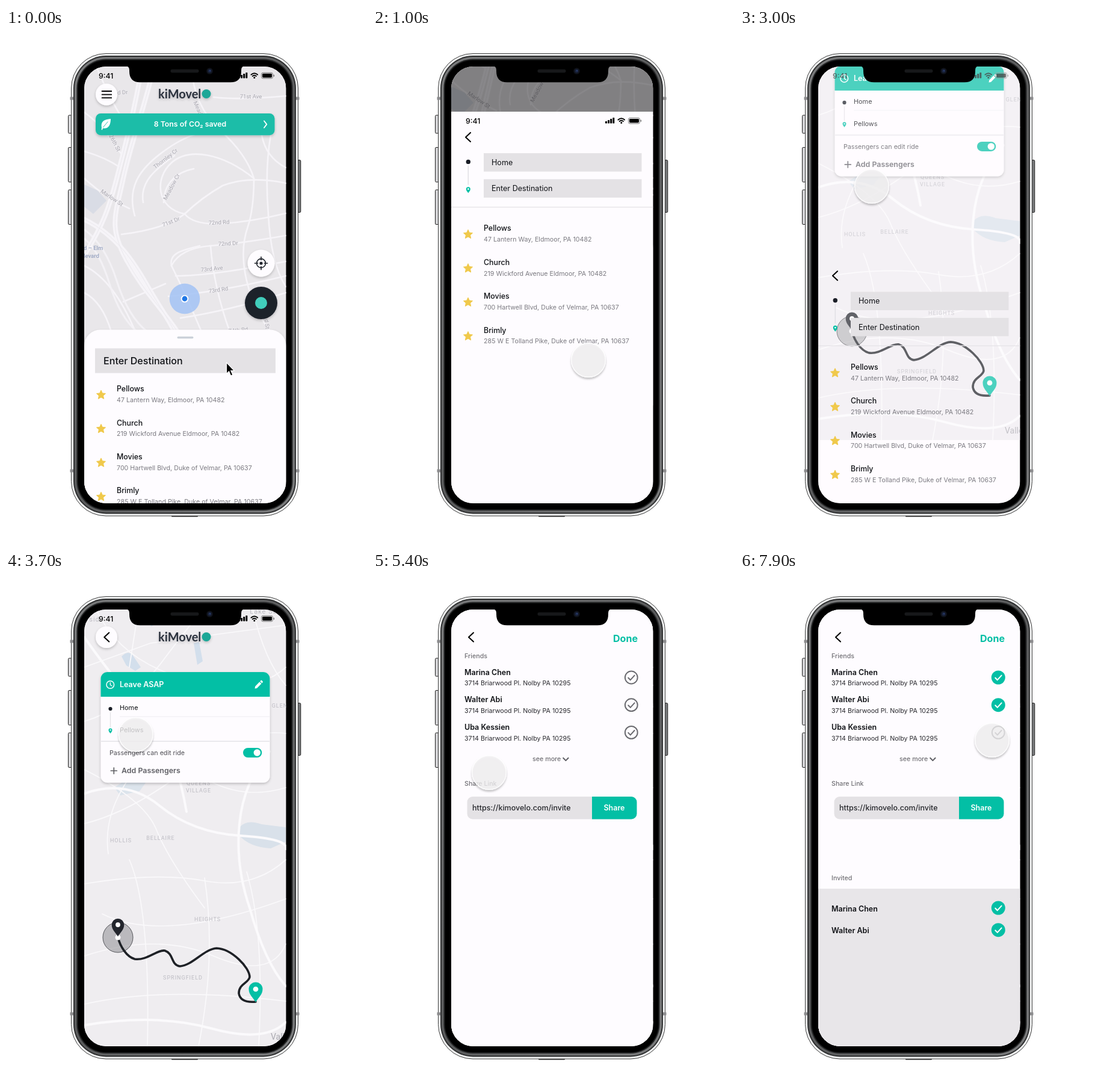
An HTML page that plays this animation: 600 px wide and 856 px high, repeating every 8 s.

```html
<!DOCTYPE html>
<html lang="en">
<head>
<meta charset="utf-8">
<title>Ride app walkthrough</title>
<style>
html, body { margin: 0; width: 100%; height: 100%; overflow: hidden; background: #fff; }
svg { display: block; width: 600px; height: 856px; font-family: Inter, sans-serif; }
.map text { font-family: Roboto, sans-serif; }
</style>
</head>
<body>
<svg id="stage" viewBox="0 0 600 856" xmlns="http://www.w3.org/2000/svg"></svg>
<script>
const TEAL = '#03bfa5', PAPER = '#fefcff', FIELD = '#e4e2e5', INK = '#101216', GREY = '#717075';
const HEIGHT = 726, LOOP = 8000, SLIDE = 380;

// ---- small drawing helpers ----
const text = (x, cy, s, size = 12.5, weight = 500, fill = INK, extra = '') =>
  `<text x="${x}" y="${cy + size * 0.36}" font-size="${size}" font-weight="${weight}" fill="${fill}" ${extra}>${s}</text>`;
const rect = (x, y, w, h, fill, r = 0, extra = '') =>
  `<rect x="${x}" y="${y}" width="${w}" height="${h}" rx="${r}" fill="${fill}" ${extra}/>`;
const disc = (x, y, r, fill, extra = '') => `<circle cx="${x}" cy="${y}" r="${r}" fill="${fill}" ${extra}/>`;
const line = (d, color, w = 2, extra = '') =>
  `<path d="${d}" fill="none" stroke="${color}" stroke-width="${w}" stroke-linecap="round" stroke-linejoin="round" ${extra}/>`;
const shape = (d, fill, extra = '') => `<path d="${d}" fill="${fill}" ${extra}/>`;
const group = (id, body, extra = '') => `<g id="${id}" ${extra}>${body}</g>`;
const pane = fill => rect(130, 64, 335.5, HEIGHT, fill);
const roads = (list, w, color) => list.map(d => line(d, color, w)).join('');
const label = (x, y, s, turn = 0, size = 9.5, fill = '#aaa9b0') =>
  text(x, y, s, size, 400, fill, `text-anchor="middle" transform="rotate(${turn} ${x} ${y})" stroke="#efedf1" stroke-width="2" paint-order="stroke"`);
const area = (x, y, s, size = 9) =>
  text(x, y, s, size, 400, '#bdbcc3', 'text-anchor="middle" letter-spacing="1"');
const back = (x, y) => line(`M${x + 4} ${y - 7.5}l-8 7.5l8 7.5`, '#000', 2.1);
const pin = (x, y, r, fill) =>
  shape(`M${x} ${y + r * 1.9}C${x - r * .4} ${y + r * 1.2} ${x - r} ${y + r * .8} ${x - r} ${y}A${r} ${r} 0 0 1 ${x + r} ${y}C${x + r} ${y + r * .8} ${x + r * .4} ${y + r * 1.2} ${x} ${y + r * 1.9}Z`, fill) +
  disc(x, y, r * 0.38, '#fff');

function star(x, y) {
  let d = '';
  for (let i = 0; i < 10; i++) {
    const r = i % 2 ? 3.8 : 7.9, a = (i / 5 - 0.5) * Math.PI;
    d += `${i ? 'L' : 'M'}${(x + r * Math.cos(a)).toFixed(2)} ${(y + r * Math.sin(a)).toFixed(2)}`;
  }
  return shape(d + 'Z', '#f0c94b', 'stroke="#f0c94b" stroke-width="1" stroke-linejoin="round"');
}

function tick(x, y, on) {
  const mark = `M${x - 5} ${y + .5}l3.5 3.7l6.8 -7.6`;
  return on ? disc(x, y, 11.5, TEAL) + line(mark, '#fff', 2)
            : disc(x, y, 10.4, 'none', `stroke="#6b6b70" stroke-width="2"`) + line(mark, '#6b6b70', 2);
}

const status = () =>
  text(154, 79.7, '9:41', 12.3, 500, '#000') +
  [0, 1, 2, 3].map(i => rect(386 + i * 4.1, 80 - i * 2, 3, 3.5 + i * 2, '#000', .7)).join('') +
  line('M407.5 77.5q5.3 -4.6 10.6 0', '#000', 2) + line('M409.7 80q3.1 -2.6 6.2 0', '#000', 1.9) + disc(412.8, 82.4, 1.5, '#000') +
  rect(424.5, 74.3, 19, 9.6, 'none', 2.6, 'stroke="#777" stroke-width="1"') +
  rect(426, 75.8, 16, 6.6, '#000', 1.4) + rect(444.7, 77.5, 1.4, 3.4, '#777', .7);

const wordmark = () =>
  `<g filter="url(#soft)">${text(253, 109.3, 'kiMovel', 20, 700, '#2b303d', 'style="font-family:Lato,sans-serif"')}${disc(333, 109.5, 7.5, '#1fa797')}</g>`;

const PLACES = [
  ['Pellows', '47 Lantern Way, Eldmoor, PA 10482'],
  ['Church', '219 Wickford Avenue Eldmoor, PA 10482'],
  ['Movies', '700 Hartwell Blvd, Duke of Velmar, PA 10637'],
  ['Brimly', '285 W E Tolland Pike, Duke of Velmar, PA 10637']
];
const places = y => PLACES.map(([name, street], i) => {
  const cy = y + i * 56.4;
  return star(158, cy + 10.3) + text(184, cy, name, 12.4) + text(184, cy + 18.4, street, 10.7, 400, '#7b7a80');
}).join('');

// ---- street map ----
function streetMap() {
  const small = [
    'M130 250Q165 282 205 300', 'M192 343Q265 334 297 309Q325 282 360 262Q405 245 465 258',
    'M214 312C200 262 225 232 262 205S330 166 385 172', 'M228 290C222 256 248 235 280 212',
    'M297 309C250 300 246 250 275 224S360 208 412 250', 'M262 290C262 262 280 240 312 234',
    'M297 309Q312 328 360 325T465 308', 'M275 395Q290 366 340 362T465 345',
    'M282 412Q340 412 465 388', 'M270 446Q360 438 465 412', 'M290 482Q370 470 465 440',
    'M275 395C270 372 300 368 322 362', 'M275 395Q300 445 325 505',
    'M345 115Q390 120 465 113', 'M308 64Q312 130 356 170T412 250Q412 300 402 330Q388 370 400 420T440 505',
    'M425 178Q432 215 465 232', 'M440 178Q430 235 436 310Q440 390 465 430', 'M340 362Q345 430 372 505',
    'M130 140Q165 165 195 215', 'M130 205Q165 215 190 232', 'M150 64Q178 130 200 160',
    'M130 395Q180 420 215 505', 'M130 440Q160 455 175 505', 'M195 455L265 425'
  ];
  const big = ['M246 64C228 140 208 190 195 250S170 330 200 385S255 460 285 505',
    'M226 64C214 135 197 200 184 250S162 325 132 375',
    'M130 318C185 345 213 390 236 430S268 480 280 505'];
  const rails = ['M130 335Q165 360 184 420T235 505', 'M130 350Q155 370 172 425T218 505'];
  return pane('#e9e7ea') +
    shape('M130 260L152 270L167 287L145 309L130 297Z', '#d9dce5') +
    roads(small, 2.6, '#f6f4f8') + roads(rails, 3, '#f3f1f5') + roads(big, 8, '#f6f4f8') +
    roads(big, 1, '#ebe9ee') +
    label(191, 107, 'nd Dr', -3) + label(407, 114, '71st Ave') + label(319, 133, 'Mead', 66) +
    label(181, 191, '26th St', 62) + label(265, 217, 'Thornley Cr', -38) + label(275, 264, 'Meadow Cr', -62) +
    label(176, 282, 'Marlow St', 34) + label(274, 322, '71st Dr', -22) + label(354, 323, '72nd Rd', -3) +
    label(369, 358, '72nd Dr', -3) + label(342, 400, '73rd Ave', -6) + label(353, 435, '73rd Rd', -8) +
    label(386, 502, '74th Rd', -6) + label(434, 492, 'd St', 84) +
    text(129, 366, 'd – Elm', 9.5, 500, '#98a4c1') + text(129, 379, 'levard', 9.5, 500, '#98a4c1');
}

function homeScreen() {
  const leaf = 'M159 166C157 155 163 152 174 151C174 162 170 168 161 166.5L160 169.5L158.5 169Z';
  return `<g class="map">${streetMap()}</g>` + status() +
    disc(167, 110.5, 18, PAPER, 'filter="url(#soft)"') +
    [105, 110.6, 116.2].map(y => rect(158.8, y - .9, 17.2, 1.8, '#000', .5)).join('') + wordmark() +
    rect(149, 142, 297.5, 36.3, '#1bbda8', 8.5, 'filter="url(#soft)"') + shape(leaf, '#fff') +
    line('M161.5 165L169 156', '#1bbda8', .9) +
    text(306, 160, '8 Tons of CO₂ saved', 12.3, 600, '#fff', 'text-anchor="middle"') +
    line('M429 154.5l4.3 5.6l-4.3 5.6', '#fff', 1.8) +
    disc(297, 450, 25.3, '#a6c4f5', 'opacity=".88"') + disc(297, 450, 6.3, '#fff') + disc(297, 450, 4.4, '#2078e6') +
    disc(424, 391, 22.5, PAPER, 'filter="url(#soft)"') +
    disc(424, 391, 7.4, 'none', 'stroke="#20242c" stroke-width="1.7"') + disc(424, 391, 2.6, '#20242c') +
    line('M424 380.5v5M424 396.5v5M413.5 391h5M429.5 391h5', '#20242c', 1.7) +
    disc(424, 457, 27, '#1c202b', 'filter="url(#soft)"') + disc(424, 457, 10, '#41cdbb') +
    rect(130, 501.5, 335.5, 560, PAPER, 27, 'filter="url(#soft)"') + rect(284.5, 512.8, 27, 3.4, '#cbd1d9', 1.7) +
    rect(148, 532.5, 300, 41, FIELD) + text(162, 552.8, 'Enter Destination', 16.1) + places(599.7);
}

function searchScreen() {
  return group('searchPaper', pane(PAPER)) + group('searchStatus', status()) +
    back(158, 106.3) + disc(158.3, 147.3, 3.7, '#1a1d26') + line('M158.3 154V185', '#e2e1e5', 1.6) + pin(158.3, 192.6, 3.5, TEAL) +
    rect(184, 133, 262.5, 30.5, FIELD) + text(197, 148.4, 'Home', 12.6, 400) +
    rect(184, 176.3, 262.5, 30.5, FIELD) + text(197, 191.5, 'Enter Destination', 12.6, 400) +
    rect(130, 222, 335.5, 1.4, '#e6e4e8') + places(257.8);
}

// ---- area map with route ----
function areaMap() {
  const thin = [
    'M130 250Q200 230 260 150T330 64', 'M150 64Q190 150 300 180T465 160', 'M130 160L240 120L465 90',
    'M130 330Q230 380 250 430T330 560', 'M130 420Q210 400 300 330T465 270', 'M170 470Q160 400 215 330',
    'M130 520Q250 500 330 515T465 480', 'M220 64L205 160', 'M410 64Q430 150 465 190',
    'M130 640Q250 600 345 640T465 620', 'M205 480Q240 560 235 790', 'M330 510Q350 640 320 790',
    'M130 720Q260 690 465 715', 'M400 500Q430 600 420 790', 'M340 350Q400 380 465 360', 'M160 570Q260 620 465 545'
  ];
  const thick = ['M130 370Q200 345 255 390T390 440T465 462', 'M438 300Q395 350 388 420T405 560Q430 650 465 690',
    'M130 755Q250 735 340 760T465 750', 'M130 110Q190 195 235 240T300 400'];
  return pane('#efedf0') +
    shape('M192 142Q204 130 212 142L224 160L215 166L200 157Z', '#d3dfec') +
    shape('M232 64L244 64L250 88L241 92Z', '#d3dfec') + shape('M312 120L321 118L327 150L318 156Z', '#d3dfec') +
    shape('M388 426Q400 412 425 421L465 426V450L440 461Q405 459 388 440Z', '#d9e1ea') +
    shape('M180 360L210 340L232 352L222 366L190 373Z', '#dce4ec') +
    roads(thin, 1.7, '#faf9fb') + roads(thick, 4, '#fbfafc') +
    area(147, 80, 'sid', 11) + area(428, 67, 'Lake Su', 11) + area(455, 224, 'GLEN') +
    area(320, 353, 'QUEENS') + area(320, 364.5, 'VILLAGE') + area(191, 447.5, 'HOLLIS') +
    area(257, 443.5, 'BELLAIRE') + area(335, 578.5, 'HEIGHTS') + area(294, 676, 'SPRINGFIELD') +
    text(440, 774, 'Valley', 14, 400, '#aaa9b0');
}

function rideScreen() {
  const route = 'M186 609C190 624 200 641 214 645C234 648 251 629 264 631C279 636 274 655 289 657C311 655 328 629 350 627C375 628 405 659 405 675C403 685 387 686 387 702C389 715 403 717 415 716';
  return `<g class="map">${areaMap()}</g>` +
    disc(186, 609, 25, '#808085', 'fill-opacity=".48" stroke="#55565b" stroke-width="1"') +
    line(route, '#1e2126', 3.6) + pin(415, 695, 11.5, TEAL) + disc(186, 609, 4.5, '#fff') + pin(186, 588, 10.3, '#22252c') +
    disc(167, 110, 18, PAPER, 'filter="url(#soft)"') + back(167.3, 110) + wordmark() +
    rect(157.5, 168, 281, 183.7, PAPER, 11, 'filter="url(#soft)"') +
    shape('M157.5 209V179a11 11 0 0 1 11 -11H427.5a11 11 0 0 1 11 11V209Z', TEAL) +
    disc(173.3, 189, 6.3, 'none', 'stroke="#fff" stroke-width="1.5"') + line('M173.3 185.3V189.2L176 191', '#fff', 1.3) +
    text(189, 188.8, 'Leave ASAP', 12.5, 600, '#fff') +
    shape('M413.5 195.5L414.2 191.8L421.4 184.2L424.5 187.3L417.2 194.8Z M422.2 183.3L423.6 182a1.2 1.2 0 0 1 1.7 0L426.6 183.4a1.2 1.2 0 0 1 0 1.7L425.3 186.4Z', '#fff') +
    disc(173.5, 229, 3.1, '#1a1d26') + line('M173.5 236V259', '#e2e1e5', 1.3) + pin(173.5, 264.4, 3, TEAL) +
    text(189, 227.4, 'Home', 10.9, 400) + rect(189, 241.5, 249, 1, '#f0eef2') + text(189, 264.3, 'Pellows', 10.9, 400) +
    rect(158, 282.4, 280, 1.3, '#e2e0e4') +
    text(172, 302, 'Passengers can edit ride', 10.7, 400, '#4e4d53') +
    rect(394, 294, 31.3, 16, TEAL, 8) + disc(417.3, 302, 5.7, '#fff') +
    line('M174.3 332h10M179.3 327v10', '#606066', 1.7) + text(192, 332, 'Add Passengers', 12.4, 600, '#606066');
}

const FRIENDS = ['Marina Chen', 'Walter Abi', 'Uba Kessien'];
function friendsScreen() {
  const list = FRIENDS.map((name, i) => {
    const y = 168 + i * 45.7;
    return text(152, y, name, 12.5, 600) + text(152, y + 18.6, '3714 Briarwood Pl. Nolby PA 10295', 10.7, 400, '#28282d') +
      group('off' + i, tick(429.3, y + 9, false)) + (i < 2 ? group('on' + i, tick(429.3, y + 9, true)) : '');
  }).join('');
  const guest = i => text(152, 561 + i * 36.7, FRIENDS[i], 12.5, 600) + tick(429.3, 560 + i * 36.7, true);
  return pane(PAPER) + back(163, 110) + text(440, 112.4, 'Done', 16.1, 700, TEAL, 'text-anchor="end"') +
    text(152, 141, 'Friends', 10.7, 500, GREY) + list +
    text(265, 312, 'see more', 10.7, 500, GREY) + line('M316.2 310.8l4.2 4.3l4.2 -4.3', '#606066', 2) +
    text(152, 353, 'Share Link', 10.7, 500, GREY) +
    rect(156.5, 375, 281.5, 37.5, FIELD, 9) + shape('M364 375H429.5a9 9 0 0 1 9 9V403.5a9 9 0 0 1 -9 9H364Z', TEAL) +
    text(165, 393.8, 'https://kimovelo.com/invite', 12.5, 500, '#26272c') +
    text(401, 393.8, 'Share', 12.5, 600, '#fff', 'text-anchor="middle"') +
    group('invited', text(152, 510.6, 'Invited', 10.7, 500, GREY) + rect(130, 528, 335.5, 262, '#e8e6e9') +
      guest(0) + group('second', guest(1)));
}

// ---- phone body ----
function phone() {
  const key = (x, y, h, fill) => rect(x, y, 6, h, fill, 1.6, 'stroke="#202020" stroke-width="1"');
  const shell = (inset, fill, extra) =>
    rect(108.5 + inset, 42.5 + inset, 377 - inset * 2, 768.5 - inset * 2, fill, 57.5 - inset, extra);
  return key(103.5, 145, 30, '#d6d6d8') + key(103.5, 198.5, 57.5, '#d6d6d8') + key(103.5, 269, 57.5, '#d6d6d8') +
    key(483.8, 219.5, 87, '#77787a') + rect(275, 809.5, 44, 3, '#2a2a2a', 1) +
    shell(0, '#f0f1f1', 'stroke="#2a2a2a" stroke-width=".9"') +
    [117, 736].map(y => rect(106.5, y - 2.5, 5.5, 5, '#8b8b8d') + rect(482, y - 2.5, 5.5, 5, '#8b8b8d')).join('') +
    shell(3.6, '#2a2b2c') + shell(5.5, 'url(#rim)') + shell(9, '#232425') + shell(11, '#000');
}
const notch = () =>
  shape('M198 63Q205 63 205 70V72C205 84 211 90.3 223 90.3H373C385 90.3 391 84 391 72V70Q391 63 398 63Z', '#000') +
  rect(273.5, 68.8, 47, 5.4, '#17181a', 2.7) + disc(338.5, 71.5, 5.3, '#10131b') + disc(338.5, 71.5, 3, '#1a2540') + disc(339, 71, 1.2, '#2c3d6c');

const stage = document.getElementById('stage');
stage.innerHTML = `<defs>
  <clipPath id="glass"><rect x="130" y="64" width="335.5" height="726" rx="36.5"/></clipPath>
  <filter id="soft" x="-30%" y="-30%" width="160%" height="170%"><feDropShadow dx="0" dy="2" stdDeviation="2.2" flood-opacity=".22"/></filter>
  <filter id="lift" x="-30%" y="-30%" width="160%" height="170%"><feDropShadow dx="0" dy="2.8" stdDeviation="1.8" flood-opacity=".27"/></filter>
  <linearGradient id="rim" x1="0" y1="0" x2="1" y2="1"><stop offset="0" stop-color="#7c7d7e"/><stop offset=".5" stop-color="#5a5b5c"/><stop offset="1" stop-color="#7c7d7e"/></linearGradient>
</defs>` + rect(0, 0, 600, 856, '#fff') + phone() +
  `<g clip-path="url(#glass)">${pane(PAPER)}` +
  group('home', homeScreen()) + group('dim', pane('#000')) +
  group('ride', rideScreen()) + group('rideStatus', status()) + group('wash', pane(PAPER)) +
  group('search', searchScreen()) + group('friends', friendsScreen()) + '</g>' + notch() +
  group('arrow', shape('M366.5 556.2V574.6L370.6 570.8L373.6 578L376.8 576.6L373.8 569.6H379.3Z', '#000', 'stroke="#fff" stroke-width="1.2"')) +
  group('touch', disc(0, 0, 28.3, '#f3f2f4', 'fill-opacity=".76" stroke="#fff" stroke-opacity=".85" stroke-width="1.4"'), 'filter="url(#lift)"');

// ---- motion ----
const $ = {};
stage.querySelectorAll('g[id]').forEach(g => $[g.id] = g);
const show = (id, on) => $[id].setAttribute('display', on ? 'inline' : 'none');
const fade = (id, a) => $[id].setAttribute('opacity', a);
const move = (id, x, y) => $[id].setAttribute('transform', `translate(${x} ${y})`);
const clamp = v => Math.max(0, Math.min(1, v));

// cubic-bezier(0, 0, .58, 1)
function easeOut(x) {
  let lo = 0, hi = 1;
  for (let i = 0; i < 24; i++) {
    const s = (lo + hi) / 2;
    if (1.74 * (1 - s) * s * s + s * s * s < x) lo = s; else hi = s;
  }
  return lo * lo * (3 - 2 * lo);
}
const slide = (t, start) => t >= start + SLIDE ? 1 : t <= start ? 0 : easeOut((t - start) / SLIDE);

// time, x, y of the touch point
const PATH = [
  [0, 366, 556], [500, 358, 552], [1400, 358, 552], [1900, 259.5, 188.5], [2500, 219, 263], [3500, 219, 263],
  [4400, 193, 333], [5000, 193, 335], [5500, 193, 335], [6200, 419, 189], [6600, 419, 189],
  [7100, 419, 235], [7400, 419, 235], [7800, 419, 281], [8000, 419, 281]
];
function touchAt(t) {
  const i = PATH.findIndex(p => p[0] > t), a = PATH[i - 1], b = PATH[i];
  const u = clamp((t - a[0]) / (b[0] - a[0])), k = u * u * (3 - 2 * u);
  return [a[1] + (b[1] - a[1]) * k, a[2] + (b[2] - a[2]) * k];
}

function draw(t) {
  const toSearch = slide(t, 720.5), toRide = slide(t, 2893), toFriends = slide(t, 4687);
  const leaving = toRide > 0;

  show('home', toSearch < 1);
  move('home', 0, -HEIGHT / 4 * toSearch);
  show('dim', toSearch > 0 && toSearch < 1);
  fade('dim', 0.5 * toSearch);

  show('search', toSearch > 0 && toRide < 1);
  move('search', 0, HEIGHT * (1 - toSearch + toRide));
  show('searchPaper', !leaving);
  show('searchStatus', !leaving);

  show('ride', leaving);
  move('ride', 0, -HEIGHT / 4 * (1 - toRide));
  show('rideStatus', leaving);
  fade('rideStatus', 0.65 + 0.35 * toRide);
  show('wash', leaving && toRide < 1);
  fade('wash', 0.5 * (1 - toRide));

  show('friends', toFriends > 0);
  move('friends', 0, HEIGHT * (1 - toFriends));
  const first = t >= 6400, second = t >= 7300;
  show('off0', !first); show('on0', first); show('invited', first);
  show('off1', !second); show('on1', second); show('second', second);

  show('arrow', t < 100);
  show('touch', t >= 100);
  move('touch', ...touchAt(t));
}

// ten steps a second
function loop() {
  draw(Math.floor(performance.now() % LOOP / 100) * 100);
  requestAnimationFrame(loop);
}
loop();
</script>
</body>
</html>
```
